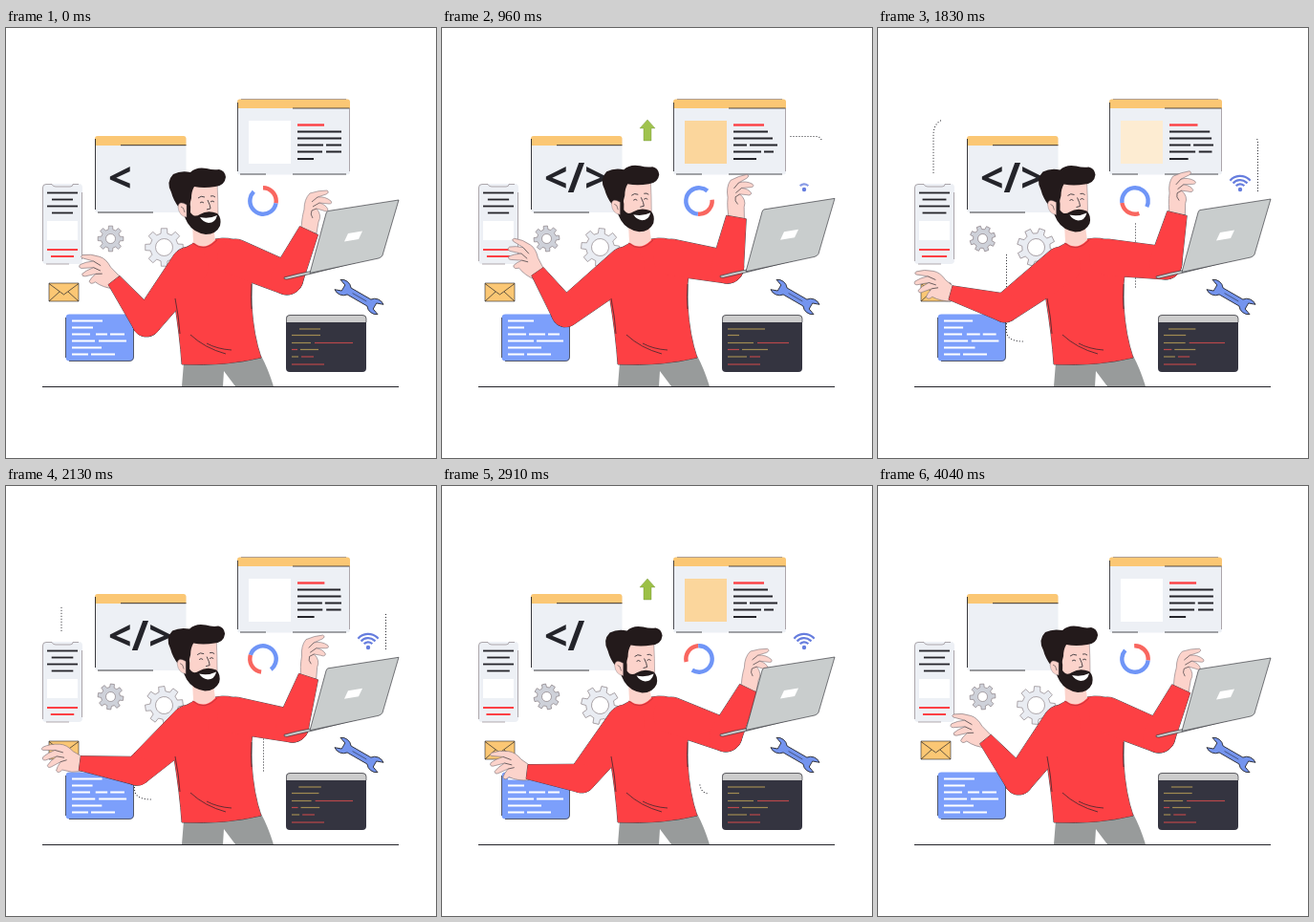
An HTML page with a canvas that plays this animation: 450 px wide and 450 px high, repeating every 4080 ms.

```html
<!DOCTYPE html>
<html lang="en">
<head>
<meta charset="utf-8">
<title>Developer at work</title>
<style>
html, body { margin: 0; width: 100%; height: 100%; overflow: hidden; background: #fff; }
canvas { display: block; width: 450px; height: 450px; }
</style>
</head>
<body>
<canvas id="stage"></canvas>
<script>
const LOOP = 4080, HALF = LOOP / 2;
const INK = '#24242a', SOFT = '#80757a', PANEL = '#edf0f5', AMBER = '#fbc774', RED = '#fd4044',
      BLUE = '#7c9ffb', SKIN = '#fcd3cb', HAIR = '#231a1b', GREY = '#989b9b';
const canvas = document.getElementById('stage');
const ctx = canvas.getContext('2d');
const dpr = window.devicePixelRatio || 1;
canvas.width = canvas.height = 450 * dpr;

const clamp = v => Math.max(0, Math.min(1, v));
const smooth = v => { v = clamp(v); return v * v * (3 - 2 * v); };
const ramp = (t, a, b) => clamp((t - a) / (b - a));
const mix = (a, b, k) => a + (b - a) * k;

// Periodic cubic through the key times
const KEYS = [0, 570, 1300, 1830, 2480, 2910];
function curve(v, t) {
  const n = KEYS.length;
  const at = i => KEYS[(i + n) % n] + Math.floor(i / n) * LOOP;
  const val = i => v[(i + n) % n];
  const slope = i => (val(i + 1) - val(i - 1)) / (at(i + 1) - at(i - 1));
  let i = n - 1;
  while (KEYS[i] > t) i--;
  const h = at(i + 1) - at(i), u = (t - at(i)) / h, u2 = u * u, u3 = u2 * u;
  return (2 * u3 - 3 * u2 + 1) * val(i) + (u3 - 2 * u2 + u) * h * slope(i) +
         (3 * u2 - 2 * u3) * val(i + 1) + (u3 - u2) * h * slope(i + 1);
}
const POSE = {
  lex: [147, 135, 127, 133, 142, 146], ley: [308, 303, 294, 293, 305, 306],
  lwx: [113, 111, 89, 76, 82, 89],     lwy: [264, 259, 255, 277, 302, 299],
  lrot: [25, 42, 36, 18, 4, 14],
  rex: [294, 297, 300, 301, 298, 297], rey: [262, 256, 246, 246, 258, 261],
  rwx: [317, 311, 307, 313, 320, 321], rwy: [212, 205, 193, 194, 207, 212],
  rrot: [0, -7, -12, -8, -2, 1],
  hx: [0, -2, -3, -2.5, 1, 0.6],       hy: [0, -2, -3, -2.5, 0, 0.5],
  lap: [0, -1.5, -1.5, -1, -0.5, -1]
};

function fill(path, color) { ctx.fillStyle = color; ctx.fill(path); }
function line(path, color = INK, w = 0.8) {
  ctx.strokeStyle = color; ctx.lineWidth = w; ctx.stroke(path);
}
function shape(d, color, w = 0.8, ink = INK) {
  const p = new Path2D(d);
  if (color) fill(p, color);
  if (w) line(p, ink, w);
}
function rounded(x, y, w, h, r) {
  const p = new Path2D();
  p.roundRect(x, y, w, h, r);
  return p;
}
function at(x, y, deg, draw) {
  ctx.save();
  ctx.translate(x, y);
  ctx.rotate(deg * Math.PI / 180);
  draw();
  ctx.restore();
}
// Rows: y, start, end, start later, end later
function bars(rows, k, color, h = 2) {
  ctx.fillStyle = color;
  for (const [y, a, b, c = a, d = b] of rows) {
    const x = mix(a, c, k);
    ctx.fillRect(x, y - h / 2, mix(b, d, k) - x, h);
  }
}

function phone(t) {
  const k = Math.sin(t * Math.PI * 4 / LOOP) ** 2;
  fill(rounded(38, 163, 42, 84, 4), PANEL);
  shape('M38.5 244 V167 Q38.5 163.5 42 163.5 H48 Q49 166 52 166 H67 Q70 166 70 163.5 H76', null, .6, SOFT);
  shape('M42 247 H66 M79.5 172 V242', null, .6, SOFT);
  bars([[172.5, 43, 75], [179.5, 48, 70, 44, 74], [186.5, 43, 75], [193.5, 48, 70, 44, 74]], k, INK, 1.8);
  ctx.fillStyle = '#fff';
  ctx.fillRect(43, 202, 32, 20);
  bars([[232, 43, 75], [239, 47, 71, 44, 74]], k, RED);
}

function codeWindow(t) {
  fill(rounded(93, 113, 95.5, 80, 3), PANEL);
  fill(rounded(93, 113, 95.5, 10, [3, 3, 0, 0]), AMBER);
  shape('M93.5 190 V116 M120 122.7 H188.5 M96 193 H154', null, .9);
  const count = (t < 3800) + (t > 450 && t < 3300) + (t > 950 && t < 2700);
  ctx.font = '700 43px "Open Sans", sans-serif';
  ctx.fillStyle = INK;
  ctx.fillText('</>'.slice(0, count), 107, 172);
}

function browser(t, k) {
  fill(rounded(242, 74.5, 118, 79, 3), PANEL);
  fill(rounded(242, 74.5, 118, 9.5, [3, 3, 0, 0]), AMBER);
  shape('M242.5 150 V78 M300 84 H359.5 M245 153 H272 M300 153 H356', null, .8);
  shape('M359.5 84 V150 M246 74.5 H356', null, .6, SOFT);
  ctx.fillStyle = '#fff';
  ctx.fillRect(254, 97, 44, 45);
  const u = t % HALF;
  ctx.globalAlpha = ramp(u, 120, 600) * (1 - ramp(u, 1650, 1980));
  ctx.fillStyle = '#fbd69c';
  ctx.fillRect(254, 97, 44, 45);
  ctx.globalAlpha = 1;
  bars([[101.5, 305, 333, 305, 337]], k, RED, 2.4);
  bars([[108.5, 305, 351, 305, 341], [115.5, 305, 351, 305, 346],
        [122.5, 305, 332, 305, 319], [122.5, 335, 351, 322, 351],
        [129.5, 305, 331, 305, 334], [129.5, 335, 351, 337, 347],
        [137, 305, 322, 305, 329]], k, INK);
}

function bluePanel(k) {
  fill(rounded(62.5, 299.5, 71, 49, 4), BLUE);
  shape('M62.5 345 V303 M133.5 304 V344 Q133.5 348.5 129 348.5 H66', null, .7);
  bars([[306.5, 69, 101, 69, 96], [313.5, 69, 91, 69, 86],
        [320.5, 69, 88], [320.5, 94, 106, 91, 108], [320.5, 109, 124, 111, 123],
        [327.5, 69, 93, 69, 96], [327.5, 97, 126, 99, 127],
        [334.5, 69, 100, 69, 104], [341.5, 69, 86], [341.5, 89, 114]], k, '#fff');
}

function darkPanel(k) {
  fill(rounded(293, 300.5, 84, 59.5, 4), '#343440');
  fill(rounded(293, 300.5, 84, 7.5, [4, 4, 0, 0]), '#cccccc');
  shape('M293.5 308 V304 Q293.5 300.5 297 300.5 H373 Q377 300.5 377 304 V308', null, .6);
  bars([[315, 307, 329, 299, 338], [321.5, 299, 329, 299, 311],
        [329.5, 299, 319, 299, 326], [336.5, 308, 327, 314, 341],
        [344, 299, 306, 299, 319]], k, '#a08a52', 1.2);
  bars([[329.5, 323, 363, 330, 363], [336.5, 299, 305, 299, 311],
        [344, 309, 322, 322, 333], [352, 299, 333]], k, '#b9474a', 1.2);
}

function envelope() {
  shape('M45 267 H76 V286 H45 Z', AMBER, .6);
  shape('M45 267.5 L60.5 279 L76 267.5 M45 286 L56 276 M76 286 L65 276', null, .7);
}

function gear(x, y, r, hole, color, angle) {
  at(x, y, angle, () => {
    const p = new Path2D(), n = 8, step = Math.PI * 2 / n;
    for (let i = 0; i < n; i++) {
      for (const [o, q] of [[-.3, .74], [-.2, 1], [.2, 1], [.3, .74]]) {
        const a = (i + o) * step;
        p.lineTo(Math.cos(a) * r * q, Math.sin(a) * r * q);
      }
    }
    p.closePath();
    p.moveTo(hole, 0);
    p.arc(0, 0, hole, 0, Math.PI * 2);
    ctx.fillStyle = color;
    ctx.fill(p, 'evenodd');
    line(p, SOFT, .6);
  });
}

function donut(angle) {
  at(269, 181, angle, () => {
    const arc = (a, b, color) => {
      const p = new Path2D();
      p.arc(0, 0, 13.7, a * Math.PI / 180, b * Math.PI / 180);
      line(p, color, 4.4);
    };
    ctx.lineCap = 'butt';
    arc(-90, 10, '#f9665f');
    arc(10, 225, '#6f95f7');
  });
}

function wrench() {
  at(369.5, 281.5, 30, () => {
    const end = 'A10 10 0 0 1 ';
    shape('M-12 -4 H12 ' + end + '26 -6 L19 -3.5 V3.5 L26 6 ' + end + '12 4 H-12 ' +
          end + '-26 6 L-19 3.5 V-3.5 L-26 -6 ' + end + '-12 -4 Z', '#7494ee', .8);
    shape('M-8 0 H9', null, .5);
  });
}

function arrow(t) {
  const u = t % HALF;
  ctx.globalAlpha = ramp(u, 120, 380) * (1 - ramp(u, 950, 1200));
  at(215, 118 - u * .0115, 0, () =>
    shape('M0 -11 L8 -2 H4 V11 H-4 V-2 H-8 Z', '#9cc046', .4, '#6f8f35'));
  ctx.globalAlpha = 1;
}

function wifi(t) {
  for (let i = 0; i < 4; i++) {
    ctx.globalAlpha = ramp(t, 750 + i * 110, 880 + i * 110) * (1 - ramp(t, 3650 - i * 110, 3780 - i * 110));
    const p = new Path2D();
    if (!i) {
      p.arc(379, 169, 2.2, 0, Math.PI * 2);
      fill(p, '#667dde');
    } else {
      p.arc(379, 169, 1.5 + i * 4.2, -Math.PI * .77, -Math.PI * .23);
      line(p, '#667dde', 2.2);
    }
  }
  ctx.globalAlpha = 1;
}

// Dotted trails: a head runs out, then the tail follows
const TRAILS = [
  ['M77 94 Q58 95 58 112 V152', 1000, 1750, 1750, 2350],
  ['M365 113.5 H391 Q397.5 113.5 397.5 120 V171', 430, 1750, 1350, 2750],
  ['M269.5 205 V308 Q269.5 322 280 322', 1100, 2450, 1880, 3080],
  ['M126 192 Q134.5 192 134.5 200 V317 Q134.5 328 152 328', 1050, 1800, 1500, 2550]
].map(([d, ...times]) => {
  const el = document.createElementNS('http://www.w3.org/2000/svg', 'path');
  el.setAttribute('d', d);
  return { el, len: el.getTotalLength(), times };
});
function trails(t) {
  ctx.fillStyle = INK;
  for (const { el, len, times: [a, b, c, d] } of TRAILS) {
    const head = len * ramp(t, a, b), tail = len * ramp(t, c, d);
    for (let s = Math.ceil(tail / 3) * 3; s < head; s += 3) {
      const p = el.getPointAtLength(s);
      ctx.fillRect(p.x - .5, p.y - .5, 1, 1);
    }
  }
}

// Tapered sleeve piece; a forearm ends in a flat cuff
function limb(x1, y1, r1, x2, y2, r2, cuff) {
  const a = Math.atan2(y2 - y1, x2 - x1), q = Math.PI / 2;
  const p = new Path2D();
  p.arc(x1, y1, r1, a + q, a - q);
  if (cuff) {
    p.lineTo(x2 + r2 * Math.cos(a - q), y2 + r2 * Math.sin(a - q));
    p.lineTo(x2 + r2 * Math.cos(a + q), y2 + r2 * Math.sin(a + q));
  } else {
    p.arc(x2, y2, r2, a - q, a + q);
  }
  p.closePath();
  return p;
}

function leftHand(m) {
  at(m.lwx, m.lwy, m.lrot, () => {
    shape('M4 -6 L-9 -11 Q-17 -17 -24 -16 Q-34 -15 -41 -10 Q-43 -7 -40 -7 L-28 -9 ' +
          'Q-35 -5 -39 0 Q-40 4 -36 3 L-25 -3 Q-31 3 -33 8 Q-32 11 -29 9 L-20 2 ' +
          'Q-23 8 -23 12 Q-20 15 -17 10 Q-7 12 4 8 Z', SKIN, .6, SOFT);
    shape('M-28 -9 L-19 -8 M-25 -3 L-17 -3 M-20 2 L-14 -1', null, .6);
  });
}

function rightHand(m) {
  at(m.rwx, m.rwy, m.rrot, () => {
    shape('M-8 3 Q-8 -12 -5 -22 Q-5 -33 1 -39 Q10 -42 19 -42 Q22 -40 18 -38 L9 -35 ' +
          'Q17 -36 23 -31 Q25 -28 21 -28 L11 -29 Q18 -27 20 -22 Q19 -19 15 -21 L8 -23 ' +
          'Q14 -16 10 -9 L8 3 Z', SKIN, .6, SOFT);
    shape('M9 -35 L3 -30 M11 -29 L4 -25 M8 -23 L3 -21 Q1 -17 4 -13', null, .6);
  });
}

function legs() {
  shape('M186 350 L184 375 H227 L228 359 L240 375 H280 Q274 356 267 343 Z', GREY, 0);
}

function sweater(m) {
  const body = new Path2D('M178 240 Q184 231 197 225 Q208 232 219 221 Q234 218 244 224 ' +
    'C256 231 260 248 257 268 L257 290 Q259 322 267 345 Q230 354 184 352 Q182 322 176 285 Q174 256 178 240 Z');
  const parts = [
    body,
    limb(192, 249, 20, m.lex, m.ley, 15),
    limb(m.lex, m.ley, 15, m.lwx, m.lwy, 7.5, true),
    limb(240, 240, 19, m.rex, m.rey, 17),
    limb(m.rex, m.rey, 17, m.rwx, m.rwy, 10.5, true)
  ];
  parts.forEach(p => line(p, INK, .8));
  parts.forEach(p => fill(p, RED));
  shape('M193 321 Q208 335 230 341 M210 330 Q221 336 236 337', null, .7);
  shape('M177 283 Q181 303 182 320 M257 268 Q256 282 257 294', null, .7);
}

function head(m) {
  shape('M195 204 L196 224 Q207 234 219 222 L217 208 Z', SKIN, 0);
  line(new Path2D('M195 225 Q208 236 221 222'), '#c9343b', 1);
  at(m.hx, m.hy, 0, () => {
    shape('M189 166 L221 161 Q222 180 222 198 Q216 211 203 209 Q191 203 187 188 Z', SKIN, .5, SOFT);
    // Beard
    shape('M188 177 Q194 179 193 193 Q197 199 203 195 Q211 190 221 194 Q226 199 224 207 ' +
          'Q220 216 209 216 Q196 214 190 204 Q184 193 184 183 Z', HAIR, 0);
    shape('M203 198 Q213 200 221 196 Q219 204 212 204 Q206 203 203 198 Z', '#fff', 0);
    // Hair
    shape('M181 188 Q175 180 173 172 Q167 161 175 153 Q183 149 193 151 Q199 145 210 147 ' +
          'Q217 149 223 148 Q229 149 230 156 Q229 165 219 166 Q207 168 197 166 ' +
          'Q194 171 194 178 L192 186 L186 184 Z', HAIR, 0);
    shape('M189 185 Q181 180 180 187 Q181 197 189 198 Z', SKIN, .4, SOFT);
    shape('M183 187 Q186 187 187 193', null, .5);
    shape('M201 178 Q204 175 208 177 M214 176 Q217 175 219 177 M211 180 Q214 186 214 189 L210 190', null, .8);
    shape('M203 183 Q205 181 207 183 M214 182 Q216 180 218 182', null, .8);
  });
}

function laptop(dy) {
  at(0, dy, 0, () => {
    shape('M291 261 Q305 257 322 254 L388 240 L320 257 L294 263 Q290 263 291 261 Z', '#c9cdcd', .6);
    shape('M337 191.5 L411 180 L394 238 Q393 240 390 241 L318 256.5 L335 194 Q335.5 192 337 191.5 Z', '#c9cdcd', .6);
    shape('M358 215 L373 212.5 L369 221 L354 223.5 Z', '#fff', 0);
  });
}

function draw(t) {
  const m = {};
  for (const key in POSE) m[key] = curve(POSE[key], t);
  const u = t % HALF;
  const k = smooth(Math.min(u, HALF - u) / 500);
  const spin = t / LOOP * 360;

  ctx.setTransform(dpr, 0, 0, dpr, 0, 0);
  ctx.fillStyle = '#fff';
  ctx.fillRect(0, 0, 450, 450);
  ctx.lineCap = 'butt';
  ctx.lineJoin = 'round';

  trails(t);
  phone(t);
  codeWindow(t);
  browser(t, k);
  bluePanel(k);
  darkPanel(k);
  envelope();
  gear(109.5, 220.5, 13.5, 5, '#ced1d9', spin);
  gear(165.5, 229.5, 20, 9, '#e9ecf2', -spin);
  donut(spin);
  wrench();
  arrow(t);
  wifi(t);
  legs();
  leftHand(m);
  rightHand(m);
  sweater(m);
  head(m);
  laptop(m.lap);
  ctx.fillStyle = INK;
  ctx.fillRect(38, 375, 373, 1);
}

const start = performance.now();
function tick() {
  draw((performance.now() - start) % LOOP);
  requestAnimationFrame(tick);
}
tick();
</script>
</body>
</html>
```
